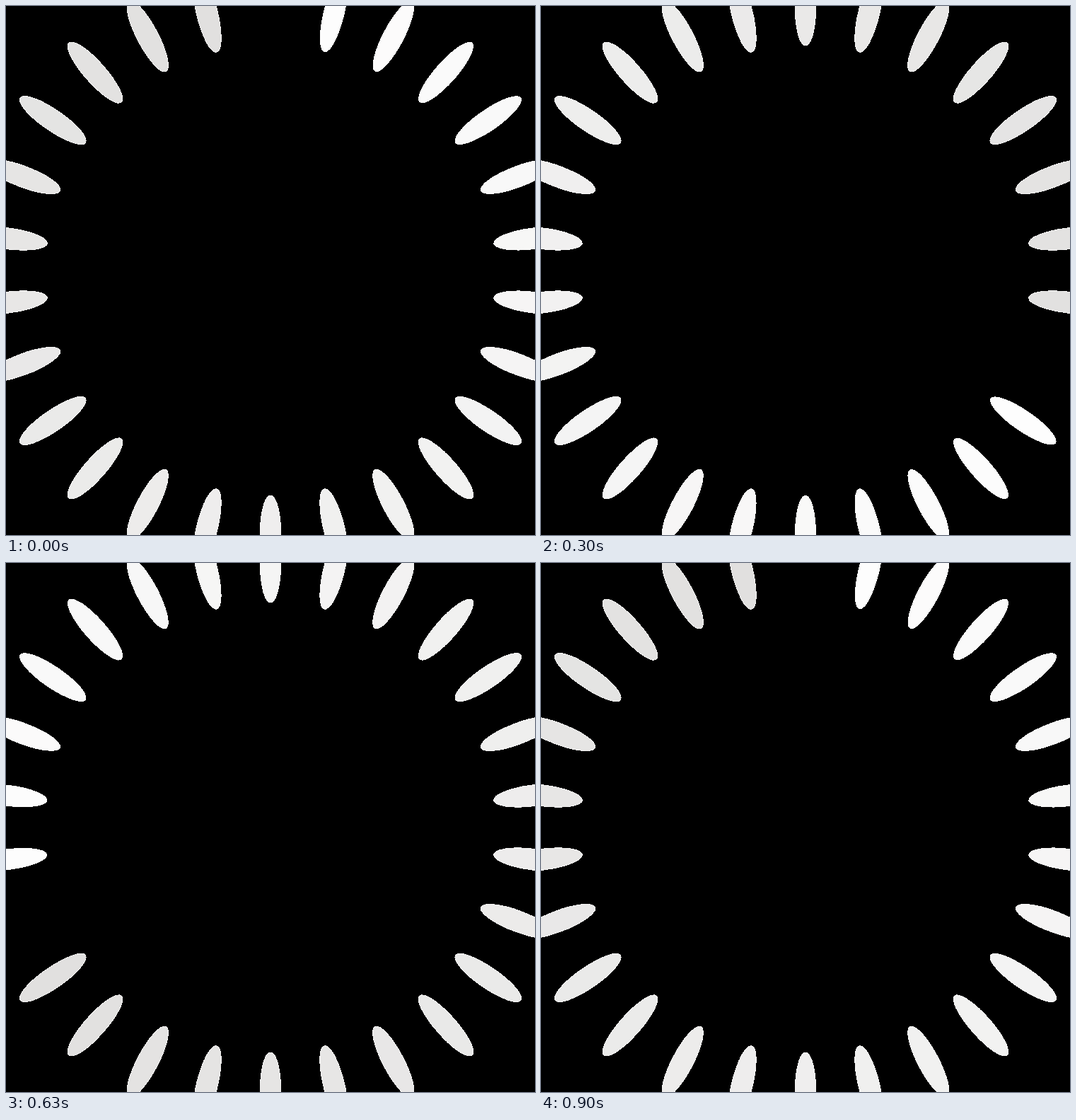
An HTML page with a canvas that plays this animation: 748x748 px, repeating every 930 ms.

```html
<!DOCTYPE html>
<html lang="en">
<head>
<meta charset="utf-8">
<title>Spinner</title>
<style>
  html, body { margin: 0; width: 100%; height: 100%; overflow: hidden; background: #000; }
  canvas { display: block; }
</style>
</head>
<body>
<canvas width="748" height="748"></canvas>
<script>
const SIZE = 748, CENTER = SIZE / 2, UNIT = SIZE / 100;
const COUNT = 26, STEP = 30, LOOP = 930, TURN = 900;
const DARK = [225, 224, 223];
const ctx = document.querySelector('canvas').getContext('2d', { willReadFrequently: true });

function drawPetal(k, head) {
  const age = (head - k - 1 + 2 * COUNT) % COUNT;
  const fade = 1 - age / COUNT;
  const angle = k * 2 * Math.PI / COUNT;
  const x = CENTER + CENTER * Math.sin(angle);
  const y = CENTER - CENTER * Math.cos(angle);
  ctx.fillStyle = `rgb(${DARK.map(c => Math.round(255 - (255 - c) * fade))})`;
  ctx.beginPath();
  ctx.ellipse(x, y, 2 * UNIT, 7.5 * UNIT, angle, 0, 2 * Math.PI);
  ctx.fill();
}

// Everything that has faded to white becomes the black backdrop.
function keyOutWhite() {
  const image = ctx.getImageData(0, 0, SIZE, SIZE);
  const data = image.data;
  for (let i = 0; i < data.length; i += 4) {
    if (data[i] >= 254) data[i] = data[i + 1] = data[i + 2] = 0;
  }
  ctx.putImageData(image, 0, 0);
}

function draw(time) {
  const head = time * COUNT / TURN;
  ctx.fillStyle = '#fff';
  ctx.fillRect(0, 0, SIZE, SIZE);
  for (let k = 0; k < COUNT; k++) drawPetal(k, head);
  keyOutWhite();
}

const start = performance.now();
let shown = -1;
function tick() {
  const time = Math.floor((performance.now() - start) % LOOP / STEP) * STEP;
  if (time !== shown) draw(shown = time);
  requestAnimationFrame(tick);
}
tick();
</script>
</body>
</html>
```
